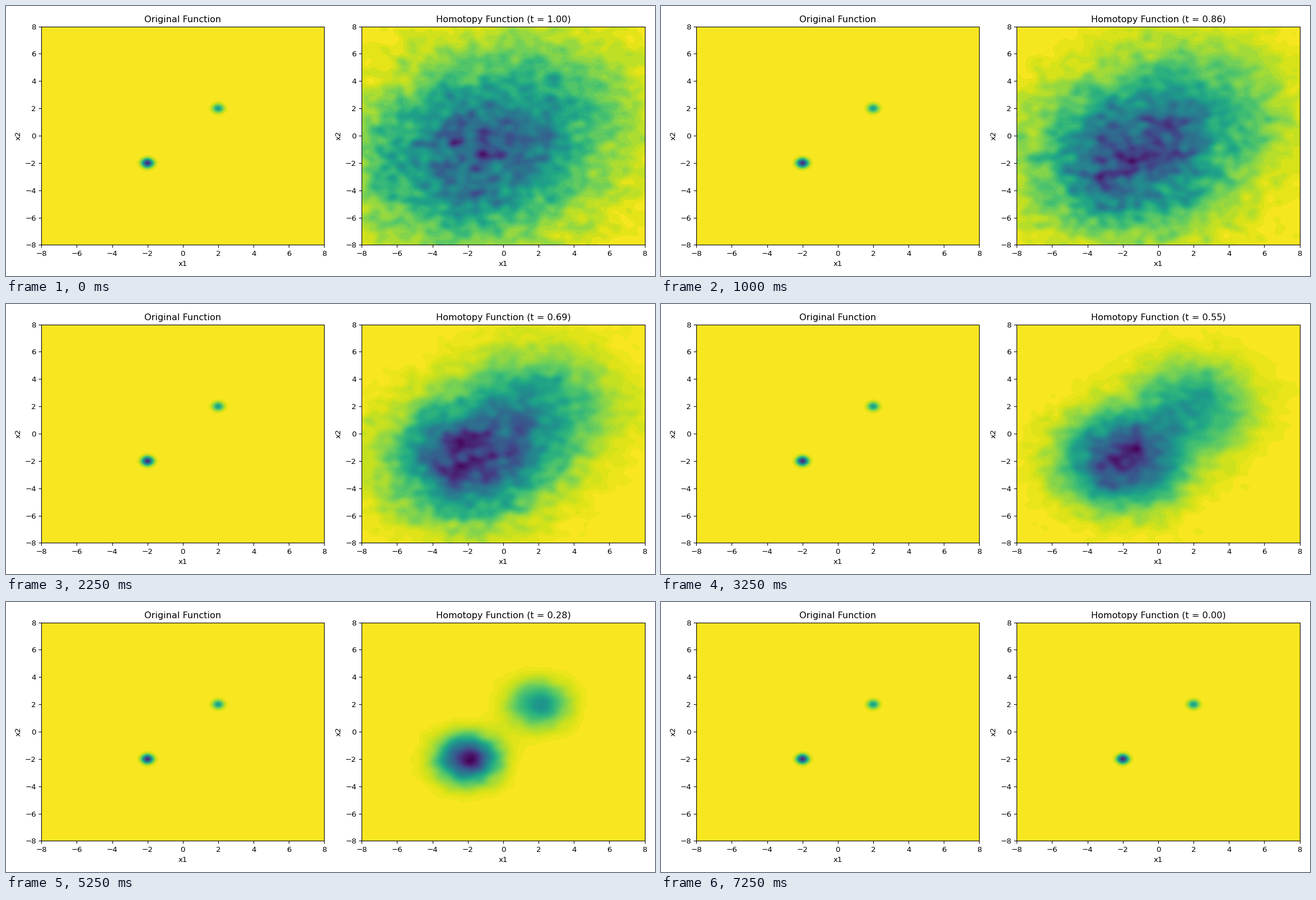
Recreate the animation shown at these times as a matplotlib script. Size 1159 by 483 pixels, loop 7.5 s.

```python
import numpy as np
import matplotlib.pyplot as plt
from matplotlib.animation import FuncAnimation

W, H, DPI = 1159, 483, 96.6
FRAMES = 30
SHARPNESS = 10     # wells are exp(-SHARPNESS * r^2)
SPREAD = 4.0       # smoothing radius at t = 1
SAMPLES = 10000
WELLS = [(-2, -2, 1.0), (2, 2, 0.5)]

grid = np.linspace(-8, 8, 100)
steps = np.linspace(1, 0, FRAMES)

plt.rcParams["font.family"] = "DejaVu Sans"


def bump(center, shift):
    d = grid[:, None] + shift[None, :] - center
    return np.exp(-SHARPNESS * d ** 2)


def landscape(shift):
    """Mean of the two-well function over random shifts of the plane."""
    total = np.zeros((grid.size, grid.size))
    for cx, cy, depth in WELLS:
        total -= depth * bump(cy, shift[1]) @ bump(cx, shift[0]).T
    return total / shift.shape[1]


def smoothed(i):
    t = steps[i]
    if t == 0:
        return landscape(np.zeros((2, 1)))
    z = np.random.default_rng(100 + i).standard_normal((2, SAMPLES))
    return landscape(SPREAD * t * z)


def add_panel(x0, x1, top=36.6, bottom=427.4):
    return fig.add_axes([x0 / W, 1 - bottom / H, (x1 - x0) / W, (bottom - top) / H])


def draw(ax, values, title):
    ax.clear()
    ax.contourf(grid, grid, values, levels=50, cmap="viridis")
    ax.set(xlim=(-8, 8), ylim=(-8, 8), xlabel="x1", ylabel="x2")
    ax.set_xticks(range(-8, 9, 2))
    ax.set_yticks(range(-8, 9, 2))
    ax.set_title(title, fontsize=12)


fig = plt.figure(figsize=(W / DPI, H / DPI), dpi=DPI)
left = add_panel(63.3, 568.4)
right = add_panel(635.3, 1140.5)


def update(i):
    draw(right, smoothed(i), f"Homotopy Function (t = {steps[i]:.2f})")
    return []


draw(left, landscape(np.zeros((2, 1))), "Original Function")

anim = FuncAnimation(fig, update, frames=FRAMES, init_func=lambda: update(0),
                     interval=250, repeat=True, repeat_delay=0, blit=False)
plt.show()
```
